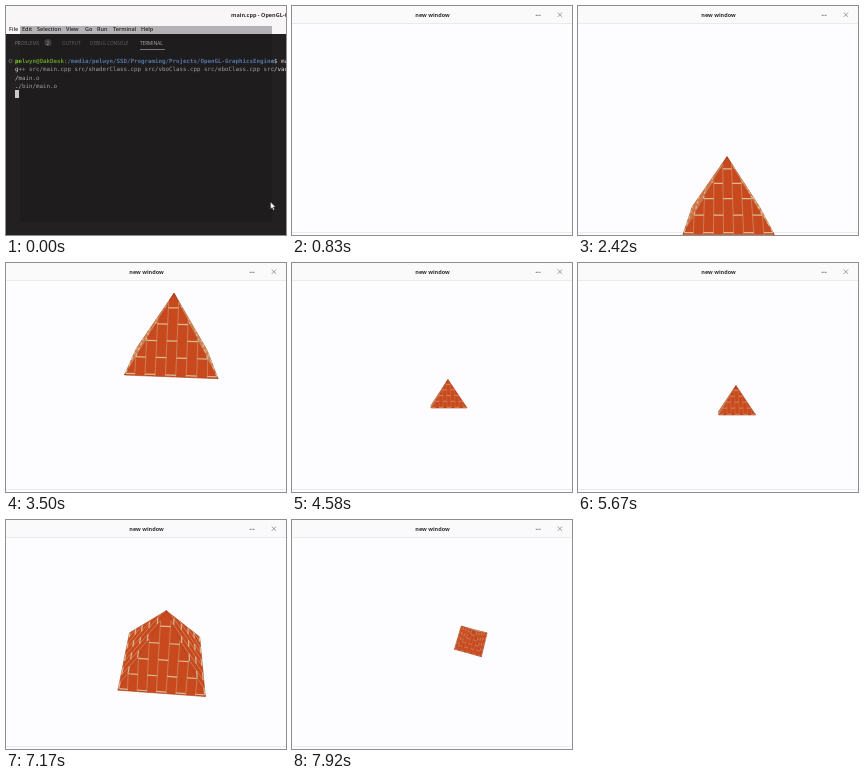
These frames come from a looping animation (280x229 px, 8000 ms). An HTML page with a canvas:

```html
<!DOCTYPE html>
<html lang="en">
<head>
<meta charset="utf-8">
<title>Pyramid viewer</title>
<style>
html, body { margin: 0; width: 100%; height: 100%; overflow: hidden; background: #fdfcfe; }
svg, canvas { position: absolute; left: 0; top: 0; width: 280px; height: 229px; }
text { white-space: pre; }
.ui { font-family: "Open Sans", "Noto Sans", sans-serif; }
.mono { font: 5.82px "DejaVu Sans Mono", "Liberation Mono", monospace; fill: #d6d6d6; }
.tabs { font-size: 4.7px; fill: #858585; }
.menu { font-size: 5.5px; fill: #2b2b2b; font-weight: 600; }
.title { font-size: 5.5px; font-weight: 700; fill: #2e2c2e; }
</style>
</head>
<body>
<svg viewBox="0 0 280 229">
  <g id="terminal">
    <rect width="280" height="229" fill="#222021"/>
    <rect width="280" height="28" fill="#f8f6f7"/>
    <text class="ui title" x="225" y="11">main.cpp - OpenGL-GraphicsEngine</text>
    <g class="ui menu">
      <text x="3" y="25">File</text><text x="16" y="25">Edit</text>
      <text x="31" y="25">Selection</text><text x="60" y="25">View</text>
      <text x="79" y="25">Go</text><text x="91" y="25">Run</text>
      <text x="107" y="25">Terminal</text><text x="135" y="25">Help</text>
    </g>
    <g class="ui tabs">
      <text x="9" y="38.5">PROBLEMS</text>
      <circle cx="42" cy="36.7" r="3.6" fill="#4d4d4d"/>
      <text x="40.6" y="38.5" fill="#ddd">2</text>
      <text x="56" y="38.5">OUTPUT</text>
      <text x="84" y="38.5">DEBUG CONSOLE</text>
      <text x="134" y="38.5" fill="#f0f0f0">TERMINAL</text>
      <path d="M134 43.5h25" stroke="#d8d8d8" stroke-width=".7"/>
    </g>
    <circle cx="4.5" cy="55" r="1.6" fill="none" stroke="#777" stroke-width=".7"/>
    <g class="mono">
      <text x="9" y="57"><tspan font-weight="700" fill="#7fd32f">pelwyn@OakDesk</tspan>:<tspan font-weight="700" fill="#6c9fdc">/media/pelwyn/SSD/Programing/Projects/OpenGL-GraphicsEngine</tspan>$ make</text>
      <text x="9" y="65.4">g++ src/main.cpp src/shaderClass.cpp src/vboClass.cpp src/eboClass.cpp src/vaoClass.cpp</text>
      <text x="9" y="73.8">/main.o</text>
      <text x="9" y="82.2">./bin/main.o</text>
    </g>
    <rect x="9" y="84" width="4" height="8" fill="#c9c9c9"/>
    <rect id="opening" x="14" y="20" width="252" height="196" fill="#181617"/>
    <path d="M264.5 196v7l1.6-1.5 1.2 2.7 1.2-.6-1.2-2.5h2.2z" fill="#fff" stroke="#222" stroke-width=".4"/>
  </g>
  <g id="window">
    <rect width="280" height="229" fill="#fdfcfe"/>
    <rect width="280" height="17" fill="#fbfafb"/>
    <path d="M0 17.5h280M0 226.5h280" stroke="#ebe9ec"/>
    <text class="ui title" x="140.5" y="11" text-anchor="middle">new window</text>
    <path d="M243.7 9.3h2M246.5 9.3h2" stroke="#777" stroke-width="1"/>
    <path d="M265.7 6.5l4.4 4.4m0-4.4l-4.4 4.4" stroke="#777" stroke-width=".7"/>
  </g>
</svg>
<canvas id="scene"></canvas>
<script>
const LOOP = 8000, STEPS = 96, FOCAL = 254, CX = 140, CY = 123;
const FIRST_WINDOW = 3, FIRST_PYRAMID = 11, COLUMNS = 9, ROWS = 5;

// step, screen x, screen y, depth, yaw, pitch
const POSES = [
  [11, 140, 123, 2, 0, 0],
  [14, 140, 123, 2, 0, 0],
  [20, 151, 160, 2.9, 0, 0],
  [29, 149, 212.5, 3.29, 0, 0],
  [31, 149, 212, 3.29, 0, 0],
  [40, 155, 142, 3.25, 2, 13],
  [42, 165, 98, 3.18, 5.7, 25.5],
  [43, 167, 96, 3.18, 5.7, 26],
  [47, 151, 177, 2.9, 0, 0],
  [48, 151, 177, 2.9, 0, 0],
  [55, 156, 143.5, 7.55, 0, 0],
  [57, 157, 150, 7.5, 0, 0],
  [63, 164, 150, 7.3, 0, 0],
  [68, 158, 150, 7.4, 0, 0],
  [75, 155, 168, 2.75, 0, 0],
  [77, 157.5, 169, 3.1, 0, 0],
  [82, 165, 85, 3.2, 3, 32],
  [88, 153, 168, 3.3, 6, 50],
  [95, 179, 121, 9.4, 17, 65]
].map(([step, u, v, z, yaw, pitch]) => ({
  step,
  view: [(u - CX) / FOCAL * z, (v - CY) / FOCAL * z, z, yaw * Math.PI / 180, pitch * Math.PI / 180]
}));

const APEX = [0, .8, 0];
const BASE = [[-.5, 0, -.5], [.5, 0, -.5], [.5, 0, .5], [-.5, 0, .5]];
const byId = id => document.getElementById(id);
const canvas = byId("scene"), ctx = canvas.getContext("2d");
const ratio = window.devicePixelRatio || 1;
canvas.width = 280 * ratio;
canvas.height = 229 * ratio;

const mix = (a, b, t) => a.map((n, i) => n + (b[i] - n) * t);

function poseAt(step) {
  const next = POSES.findIndex(p => p.step >= step);
  const b = POSES[next], a = POSES[Math.max(0, next - 1)];
  return a === b ? a.view : mix(a.view, b.view, (step - a.step) / (b.step - a.step));
}

function makeProjector([tx, ty, tz, yaw, pitch]) {
  const cy = Math.cos(yaw), sy = Math.sin(yaw), cp = Math.cos(pitch), sp = Math.sin(pitch);
  return ([x, y, z]) => {
    const side = x * cy + z * sy, away = z * cy - x * sy;
    const scale = FOCAL / (tz + away * cp - y * sp);
    return [CX + (tx + side) * scale, CY + (ty - y * cp - away * sp) * scale];
  };
}

function trace(points) {
  ctx.beginPath();
  points.forEach(p => ctx.lineTo(...p));
}

function facing(points) {
  const [a, b, c] = points;
  return (b[0] - a[0]) * (c[1] - a[1]) - (b[1] - a[1]) * (c[0] - a[0]) < 0;
}

function drawSide(a, b, project, size) {
  const corners = [a, b, APEX].map(project);
  if (!facing(corners)) return;
  const middle = mix(a, b, .5);
  const at = (u, v) => project(mix(a, b, u).map((n, i) => n + (APEX[i] - middle[i]) * v));
  const line = (u1, v1, u2, v2) => { ctx.moveTo(...at(u1, v1)); ctx.lineTo(...at(u2, v2)); };

  trace(corners);
  ctx.closePath();
  ctx.fillStyle = "#c9491f";
  ctx.fill();
  ctx.strokeStyle = "#a83c1b";
  ctx.lineWidth = .6;
  ctx.stroke();

  ctx.beginPath();
  for (let i = 1; i < COLUMNS; i++) {
    const u = i / COLUMNS;
    line(u, 0, u, 1 - Math.abs(2 * u - 1));
  }
  ctx.strokeStyle = "#cf8a5c";
  ctx.lineWidth = .85 * size;
  ctx.stroke();

  // Joints alternate between neighbouring columns.
  ctx.beginPath();
  for (let row = 0; row < ROWS; row++) {
    const v = (row + .1) / ROWS;
    for (let i = row % 2; i < COLUMNS; i += 2) {
      const left = Math.max(i / COLUMNS, v / 2), right = Math.min((i + 1) / COLUMNS, 1 - v / 2);
      if (left < right) line(left, v, right, v);
    }
  }
  ctx.strokeStyle = "#d9bb92";
  ctx.lineWidth = 1.3 * size;
  ctx.stroke();
}

function drawPyramid(step) {
  const view = poseAt(step), project = makeProjector(view), size = 3 / view[2];
  ctx.save();
  ctx.beginPath();
  ctx.rect(0, 18, 280, 211);
  ctx.clip();
  const floor = BASE.map(project);
  if (!facing(floor)) {
    trace(floor);
    ctx.fillStyle = "#b9431d";
    ctx.fill();
  }
  BASE.forEach((corner, i) => drawSide(corner, BASE[(i + 1) % 4], project, size));
  ctx.restore();
}

function render(now) {
  const step = Math.floor((now % LOOP) / LOOP * STEPS + .05) % STEPS;
  const open = step >= FIRST_WINDOW;
  byId("terminal").style.display = open ? "none" : "";
  byId("window").style.display = open ? "" : "none";
  byId("opening").style.opacity = [.3, .7, 1][step] ?? 0;
  ctx.setTransform(ratio, 0, 0, ratio, 0, 0);
  ctx.clearRect(0, 0, 280, 229);
  if (step >= FIRST_PYRAMID) drawPyramid(step);
}

const start = performance.now();
function tick() {
  render(performance.now() - start);
  requestAnimationFrame(tick);
}
tick();
</script>
</body>
</html>
```
